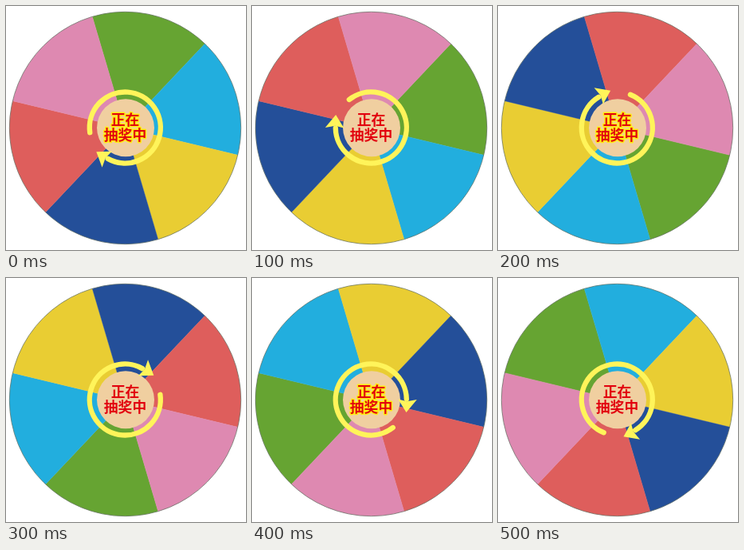
Write an HTML page that moves like this. It is 301 px wide and 305 px high and loops after 0.6 s.

```html
<!DOCTYPE html>
<html lang="zh-CN">
<head>
<meta charset="utf-8">
<style>
  html, body { margin: 0; width: 100%; height: 100%; overflow: hidden; background: #fff; }
  svg { display: block; }
  text {
    font: bold 17.8px "Noto Sans CJK SC", "Noto Sans CJK", sans-serif;
    text-anchor: middle; fill: #e2000f; paint-order: stroke; stroke-linejoin: round;
  }
  .lit text { stroke: #ffee10; stroke-width: 3px; }
</style>
</head>
<body>
<svg width="301" height="305" viewBox="0 0 301 305">
  <g transform="translate(149.5 152.5)">
    <g id="wheel"></g>
    <circle r="145.2" fill="none" stroke="#5d6b5d" stroke-width=".7"/>
  </g>
  <circle cx="150" cy="152.3" r="36" fill="#f0cfa0"/>
  <g transform="translate(149.3 152)">
    <g id="arrow" fill="#fff45a">
      <path id="arc" fill="none" stroke="#fff45a" stroke-width="6.4" stroke-linecap="round"/>
      <path id="head"/>
    </g>
  </g>
  <g id="label">
    <text x="149.5" y="149">正在</text>
    <text x="149.5" y="168">抽奖中</text>
  </g>
</svg>
<script>
const $ = id => document.getElementById(id);
const polar = (r, deg) => {
  const a = deg * Math.PI / 180;
  return (r * Math.cos(a)).toFixed(2) + ' ' + (r * Math.sin(a)).toFixed(2);
};

const colors = ['#66a432', '#22aede', '#e9cd33', '#244f99', '#de5e5c', '#de89b1'];
$('wheel').innerHTML = colors.map((c, i) => {
  const a = -106.5 + i * 60;
  return `<path fill="${c}" stroke="${c}" stroke-width=".4"
    d="M0 0L${polar(145, a)}A145 145 0 0 1 ${polar(145, a + 60)}Z"/>`;
}).join('');

$('arc').setAttribute('d', `M${polar(44.5, 172)}A44.5 44.5 0 1 1 ${polar(44.5, 119)}`);
$('head').setAttribute('d',
  `M${polar(47, 140)}L${polar(57.5, 120)}L${polar(45, 123)}L${polar(34, 119)}Z`);

function draw(now) {
  const step = Math.floor(now / 100) % 6;
  for (const id of ['wheel', 'arrow']) $(id).setAttribute('transform', `rotate(${step * 60})`);
  $('label').setAttribute('class', step % 2 ? '' : 'lit');
}

const start = performance.now();
function tick() {
  draw(performance.now() - start);
  requestAnimationFrame(tick);
}
tick();
</script>
</body>
</html>
```
